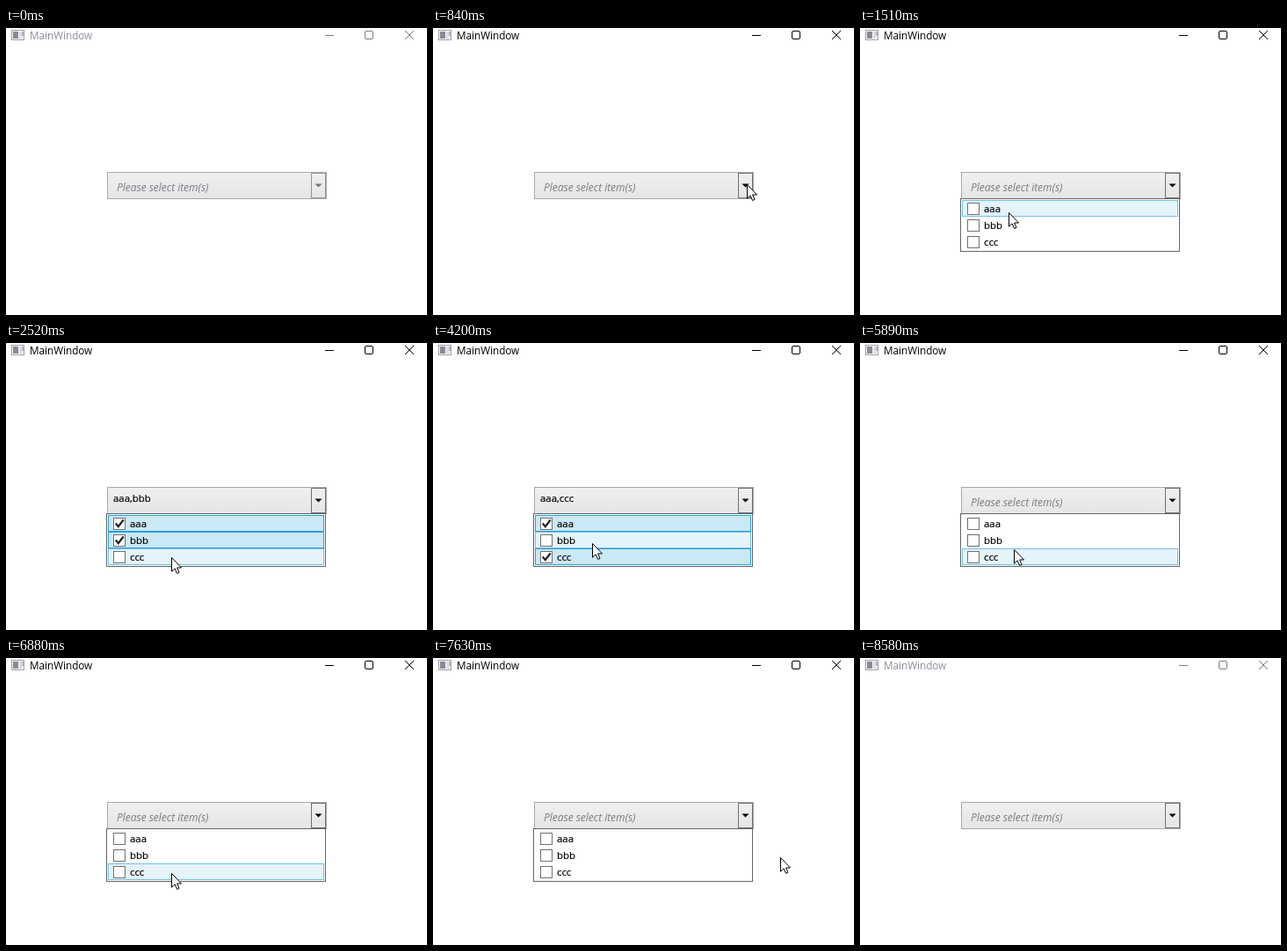
An HTML page for the animation above (8.65 s loop, 479 by 327 pixels).

```html
<!DOCTYPE html>
<html lang="en">
<head>
<meta charset="utf-8">
<title>MainWindow</title>
<style>
  html, body { margin: 0; width: 100%; height: 100%; overflow: hidden; background: #fff; }
  svg { display: block; width: 479px; height: 327px; font: 11.4px "Open Sans", "Noto Sans", sans-serif; }
  .title { font-size: 11.7px; fill: #8f8c98; }
  .glyphs { fill: none; stroke: #7d7b84; }
  .active .title { fill: #000; }
  .active .glyphs { stroke: #000; }
  .hint { font-size: 12px; font-style: italic; fill: #7c7c7c; }
  .toggle { stroke: #707070; }
  .dim .hint { fill: #7f7b88; }
  .dim .toggle { stroke: #95929d; }
  .dim .arrow { fill: #77737f; }
  .row text, .value { stroke: #000; stroke-width: .2; }
  .back { fill: none; }
  .hover .back { fill: #e5f3fb; stroke: #70c0e7; }
  .on .back { fill: #cbe8f6; stroke: #26a0da; }
  .tick { fill: none; stroke: #212121; stroke-width: 2.2; visibility: hidden; }
  .on .tick { visibility: visible; }
</style>
</head>
<body>
<svg id="stage" viewBox="0 0 479 327">
  <defs>
    <linearGradient id="face" x2="0" y2="1">
      <stop stop-color="#f0f0f0"/>
      <stop offset="1" stop-color="#e5e5e5"/>
    </linearGradient>
  </defs>
  <rect width="479" height="327" fill="#fff"/>

  <rect x="6.5" y="2.5" width="14" height="11" fill="#f4f4f6" stroke="#a0a0a8"/>
  <rect x="8" y="4" width="6" height="8" fill="#8a8a96"/>
  <rect x="15" y="4" width="3" height="8" fill="#dcdce6"/>
  <rect x="18" y="4" width="2" height="5" fill="#b8b8c4"/>
  <text class="title" x="27" y="13">MainWindow</text>
  <g class="glyphs">
    <path d="M363 8.5H373M454 3l10 10M464 3l-10 10"/>
    <rect x="408.5" y="3.5" width="9" height="9" rx="1.5"/>
  </g>

  <rect x="115.5" y="164.5" width="249" height="30" fill="url(#face)" stroke="#a8a8aa"/>
  <rect class="toggle" x="347.5" y="165.5" width="16" height="28" fill="url(#face)"/>
  <path class="arrow" d="M351.5 177.5h8l-4 4z"/>
  <text id="hint" class="hint" x="126" y="186">Please select item(s)</text>
  <text id="value" class="value" x="122" y="181"></text>

  <g id="popup">
    <rect x="114.5" y="194.5" width="249" height="60" fill="#fff" stroke="#646464"/>
  </g>
  <path id="cursor" d="M.5.5V16.3L4.1 12.9 6.6 18.5 9 17.4 6.6 12H11.5Z" fill="#fff" stroke="#000"/>
</svg>
<script>
const LOOP = 8650, TICK = 70;
const ENTER = 110, ACTIVATE = 840, OPEN = 980, LEAVE = 8050, CLOSE = 8580;
const ROW = 19, LIST_TOP = 196;
const $ = id => document.getElementById(id);
const names = ["aaa", "bbb", "ccc"];

// Each move eases the pointer on from where it last rested
const moves = [
  { from: ENTER, to: ACTIVATE, x: 357, y: 178 },
  { from: OPEN, to: 1500, x: 167, y: 210 },
  { from: 1850, to: 2500, x: 188, y: 244 },
  { from: 3430, to: 3520, x: 181, y: 228 },
  { from: 4200, to: 4740, x: 172, y: 209 },
  { from: 5080, to: 5280, x: 175, y: 235 },
  { from: 5960, to: 6040, x: 188, y: 245 },
  { from: 6880, to: 7290, x: 464, y: 2 },
  { from: 7290, to: 7700, x: 389, y: 246 },
  { from: 7700, to: LEAVE, x: 214, y: 301 }
];
const clicks = [1640, 2240, 2850, 3800, 4880, 5890];

function pointer(time) {
  const t = Math.floor(time / TICK) * TICK;
  let x = 306, y = 318;
  for (const m of moves) {
    const u = Math.min(1, Math.max(0, (t - m.from) / (m.to - m.from)));
    const k = u * u * (3 - 2 * u);
    x += (m.x - x) * k;
    y += (m.y - y) * k;
  }
  return { x: Math.round(x), y: Math.round(y) };
}

function rowAt({ x, y }) {
  return x >= 116 && x < 362 ? Math.floor((y - LIST_TOP) / ROW) : -1;
}

const rows = names.map((name, i) => {
  const y = LIST_TOP + ROW * i;
  $("popup").insertAdjacentHTML("beforeend", `<g class="row">
    <rect class="back" x="116.5" y="${y + .5}" width="245" height="18"/>
    <rect x="122.5" y="${y + 3.5}" width="13" height="13" fill="#fff" stroke="#707070"/>
    <path class="tick" d="M124.8 ${y + 9.5}l3 3.7 5.8-7.7"/>
    <text x="141" y="${y + 14}">${name}</text></g>`);
  return $("popup").lastElementChild;
});

const show = (el, on) => el.setAttribute("visibility", on ? "visible" : "hidden");

function draw(t) {
  const tip = pointer(t);
  const picked = clicks.filter(c => c <= t).map(c => rowAt(pointer(c)));
  const on = names.map((_, i) => picked.filter(p => p === i).length % 2 === 1);
  const text = names.filter((_, i) => on[i]).join(",");

  $("stage").classList.toggle("dim", t < ENTER);
  $("stage").classList.toggle("active", t >= ACTIVATE && t < CLOSE);
  $("popup").style.display = t >= OPEN && t < CLOSE ? "" : "none";
  rows.forEach((row, i) => {
    row.classList.toggle("on", on[i]);
    row.classList.toggle("hover", rowAt(tip) === i);
  });
  $("value").textContent = text;
  show($("hint"), !text);
  show($("cursor"), t >= ENTER && t < LEAVE);
  $("cursor").setAttribute("transform", `translate(${tip.x} ${tip.y})`);
}

const start = performance.now();
function frame() {
  draw((performance.now() - start) % LOOP);
  requestAnimationFrame(frame);
}
frame();
</script>
</body>
</html>
```
